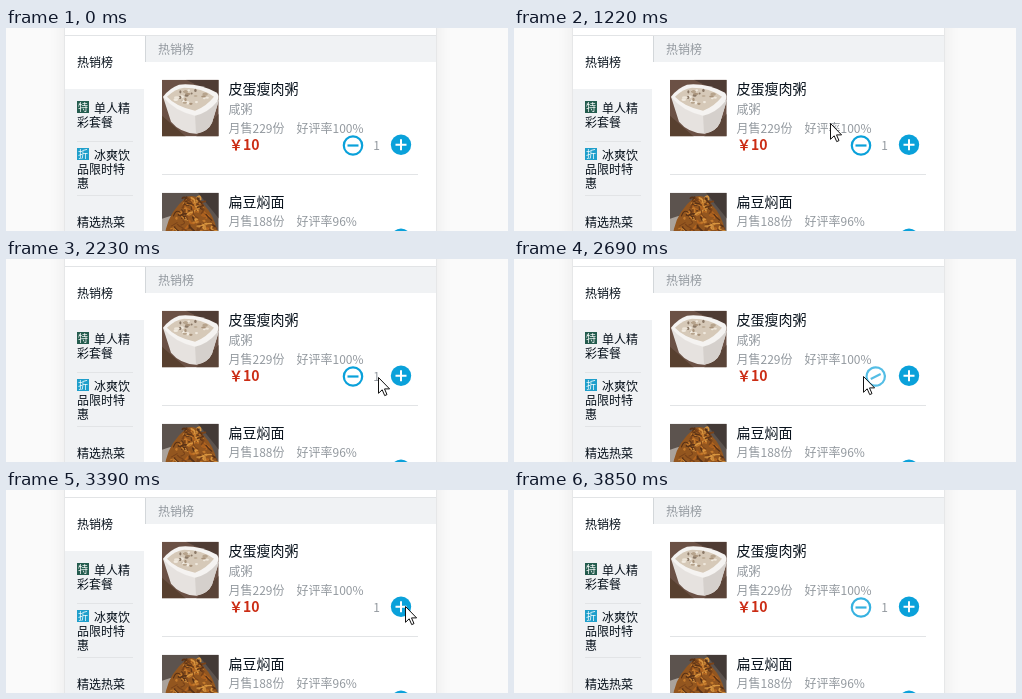
These frames come from a looping animation (502 px wide and 203 px high, 4.31 s). An HTML page:

```html
<!DOCTYPE html>
<html lang="zh-CN">
<head>
<meta charset="utf-8">
<title>点餐列表</title>
<style>
  html, body { margin: 0; width: 100%; height: 100%; overflow: hidden; background: #fafafa; }
  .stage { position: relative; width: 502px; height: 203px; overflow: hidden; }
  .card {
    position: absolute; left: 58px; top: -30px; width: 371px; height: 270px;
    background: #fff; border: 1px solid #e6e7e8; box-shadow: 0 0 16px rgba(0, 0, 0, .07);
  }
  svg { position: absolute; left: 0; top: 0; display: block; }
  text { font: 12px "Noto Sans CJK SC", "Noto Sans CJK JP", "Noto Sans CJK", "Noto Sans", sans-serif; fill: #07111b; }
  .name { font-size: 14px; }
  .soft { fill: #93999f; }
  .price { font-size: 14px; font-weight: 700; fill: #cb2c14; }
  .badge { font-size: 10px; fill: #fff; text-anchor: middle; }
  .band { fill: #f0f2f4; }
  .rule { fill: #e2e4e6; }
</style>
</head>
<body>
<div class="stage">
<div class="card"></div>
<svg width="502" height="203" viewBox="0 0 502 203">
  <defs>
    <clipPath id="photo"><rect width="56.5" height="56.5"/></clipPath>
    <g id="plus">
      <circle r="10.2" fill="#0aa1da"/>
      <path d="M-5.5 0H5.5M0-5.5V5.5" stroke="#fff" stroke-width="2"/>
    </g>
  </defs>

  <!-- menu -->
  <rect class="band" x="59" y="61" width="79" height="142"/>
  <rect class="rule" x="59" y="7" width="371" height="1"/>
  <rect class="rule" x="71" y="113" width="56" height="1"/>
  <rect class="rule" x="71" y="167" width="56" height="1"/>
  <text x="71" y="39">热销榜</text>
  <rect x="71" y="73" width="12" height="12" fill="#245c4e"/>
  <text class="badge" x="77" y="83">特</text>
  <text x="88" y="85">单人精</text>
  <text x="71" y="99">彩套餐</text>
  <rect x="71" y="120" width="12" height="12" fill="#1f9fcb"/>
  <text class="badge" x="77" y="130">折</text>
  <text x="88" y="132">冰爽饮</text>
  <text x="71" y="146">品限时特</text>
  <text x="71" y="160">惠</text>
  <text x="71" y="199">精选热菜</text>

  <!-- section title -->
  <rect class="band" x="139" y="8" width="291" height="26"/>
  <rect x="139" y="8" width="1" height="26" fill="#d3d7da"/>
  <text class="soft" x="152" y="26">热销榜</text>

  <!-- porridge -->
  <g transform="translate(156 51.7)" clip-path="url(#photo)">
    <rect width="57" height="57" fill="#6b5145"/>
    <path d="M24 0H57V16Z" fill="#4f3c34"/>
    <path d="M0 36L24 57H0Z" fill="#58402f"/>
    <path d="M57 34V57H34Z" fill="#5a4438"/>
    <path d="M1 17L9 42Q18 53 34 54Q46 52 50 43L57 20L33 32Z" fill="#e6e2df"/>
    <path d="M33 34L57 20L50 43Q46 52 34 54Z" fill="#d5d0cc"/>
    <path d="M1 17Q8 8 17 5Q36 3 55 13Q58 17 55 22Q46 33 33 36Q12 31 1 17Z" fill="#f5f3f1"/>
    <path d="M5 17Q13 9 22 8Q40 8 52 17Q44 27 33 31Q14 27 5 17Z" fill="#d6c9b8"/>
    <g id="bits"></g>
  </g>
  <text class="name" x="222.5" y="66">皮蛋瘦肉粥</text>
  <text class="soft" x="222.5" y="86">咸粥</text>
  <text class="soft" x="222.5" y="105">月售229份</text>
  <text class="soft" x="290.5" y="105">好评率100%</text>
  <text class="price" x="223" y="122">￥10</text>
  <rect class="rule" x="156" y="146" width="256" height="1"/>

  <!-- noodles -->
  <g transform="translate(156 164.7)" clip-path="url(#photo)">
    <rect width="57" height="57" fill="#5c534e"/>
    <path d="M36 0H57V26Z" fill="#433a36"/>
    <path d="M0 26Q14 20 28 24V57H0Z" fill="#aaa29b"/>
    <path d="M4 36Q8 18 25 4Q35 1 41 11Q52 22 55 38L57 57H0Z" fill="#93561f"/>
    <g id="noodles" fill="none" stroke-linecap="round"></g>
  </g>
  <text class="name" x="222.5" y="179">扁豆焖面</text>
  <text class="soft" x="222.5" y="198">月售188份</text>
  <text class="soft" x="290.5" y="198">好评率96%</text>
  <use href="#plus" x="395" y="210.7"/>

  <!-- cart control -->
  <g id="minus" fill="none" stroke="#0aa1da" stroke-width="2.2">
    <circle r="9.2"/>
    <path d="M-5.5 0H5.5"/>
  </g>
  <text class="soft" id="count" x="370.5" y="122" text-anchor="middle">1</text>
  <use href="#plus" x="395" y="116.8"/>

  <path id="cursor" d="M.5 .5V16.3L4.2 12.8L6.7 18.6L9 17.6L6.5 11.9H11.6Z" fill="#fff" stroke="#111"/>
</svg>
</div>
<script>
  const $ = id => document.getElementById(id);
  const LOOP = 4310, TICK = 77.5, START = 126, EXIT = 47, REST = 48;
  const SLIDE = 48, TURN = -85, MOVE = 400, GLOW = 560;
  const LEAVE = 2565, ENTER = 3390;

  // pointer moves: first tick, number of ticks, end point
  const enterAt = { x: 353, y: 188 };
  const moves = [
    { at: 0, len: 4, x: 284, y: 112 },
    { at: 7, len: 4, x: 308, y: 98 },
    { at: 13, len: 1, x: 316, y: 95 },
    { at: 14, len: 9, x: 391, y: 118 },
    { at: 26, len: 1, x: 372, y: 118 },
    { at: 27, len: 3, x: 349, y: 117 },
    { at: 33, len: 5, x: 399, y: 116 },
    { at: 43, len: 3, x: 434, y: 184 }
  ];

  const clamp = v => Math.max(0, Math.min(1, v));
  const smooth = v => v * v * (3 - 2 * v);

  let seed = 7;
  const rnd = (a, b) => {
    seed = (seed * 16807) % 2147483647;
    return a + (b - a) * seed / 2147483647;
  };
  const pick = list => list[Math.floor(rnd(0, list.length))];

  function add(parent, tag, attrs) {
    const el = document.createElementNS("http://www.w3.org/2000/svg", tag);
    for (const k in attrs) el.setAttribute(k, attrs[k]);
    parent.append(el);
  }

  for (let i = 0; i < 26; i++) {
    const a = rnd(0, 2 * Math.PI), r = Math.sqrt(rnd(0, 0.8));
    add($("bits"), "ellipse", {
      cx: 29 + 19 * r * Math.cos(a), cy: 18 + 9 * r * Math.sin(a),
      rx: rnd(1, 3), ry: rnd(0.8, 1.8),
      fill: pick(["#8a7866", "#a8927a", "#f0e9de", "#eee6da", "#b7a48d"])
    });
  }

  // strands widen downwards to form a heap
  for (let i = 0; i < 110; i++) {
    const y = rnd(5, 44), x = 31 + rnd(-1, 1) * (3 + y * 0.55);
    add($("noodles"), "path", {
      d: `M${x} ${y}q${rnd(-5, 5)} ${rnd(-4, 4)} ${rnd(-7, 7)} ${rnd(-1, 7)}`,
      stroke: pick(["#c47a2c", "#b5651f", "#d8953f", "#5a3216", "#7a4319"]),
      "stroke-width": rnd(1, 1.9)
    });
  }

  function pointer(tick) {
    let { x, y } = enterAt;
    for (const m of moves) {
      const k = smooth(clamp((tick - m.at) / m.len));
      x += (m.x - x) * k;
      y += (m.y - y) * k;
    }
    return `translate(${Math.round(x)} ${Math.round(y)})`;
  }

  function draw(ms) {
    const tick = Math.min(REST, Math.floor((ms - START) / TICK));
    const t = START + tick * TICK + 4;

    $("cursor").style.display = tick >= 0 && tick < EXIT ? "" : "none";
    $("cursor").setAttribute("transform", pointer(tick));

    const gone = clamp((t - LEAVE) / MOVE);
    const away = gone - clamp((t - ENTER) / MOVE);
    const hidden = gone - clamp((t - ENTER) / GLOW);
    $("minus").setAttribute("transform", `translate(${347 + SLIDE * away} 117.5) rotate(${TURN * away})`);
    $("minus").setAttribute("opacity", 1 - hidden);
    $("count").style.display = t > LEAVE && t < ENTER - 10 ? "none" : "";
  }

  const begin = performance.now();
  function frame() {
    draw((performance.now() - begin) % LOOP);
    requestAnimationFrame(frame);
  }
  frame();
</script>
</body>
</html>
```
